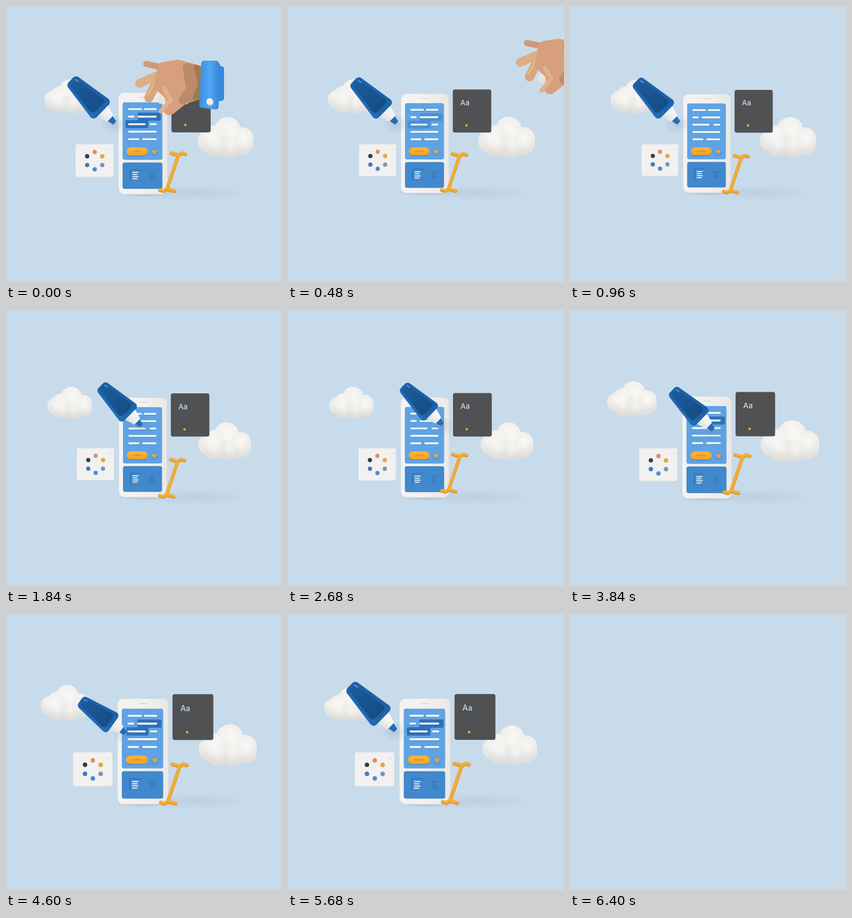
Write an HTML page with a canvas that moves like this. It is 500 by 500 pixels and loops after 6.44 s.

```html
<!DOCTYPE html>
<html lang="en">
<head>
<meta charset="utf-8">
<title>Design tools</title>
<style>
  html, body { margin: 0; width: 100%; height: 100%; overflow: hidden; background: #c8dbeb; }
  canvas { display: block; width: 500px; height: 500px; }
</style>
</head>
<body>
<canvas id="stage"></canvas>
<script>
const LOOP = 6440, STEP = 40, BLANK_AT = 6400, TAU = Math.PI * 2;
const canvas = document.getElementById('stage');
const g = canvas.getContext('2d');
const dpr = window.devicePixelRatio || 1;
canvas.width = canvas.height = 500 * dpr;

// Motion helpers
const span = (t, a, b) => Math.max(0, Math.min(1, (t - a) / (b - a)));
const ease = u => u * u * (3 - 2 * u);
const mix = (a, b, u) => a + (b - a) * u;
const bump = (t, peak, width) => ease(Math.max(0, 1 - Math.abs(t - peak) / width));
// Looping wave that crests n times, first at the given time
const wave = (t, n, crest) => Math.cos(TAU * n * (t - crest) / LOOP);

const zoomAt = t => .959 + .0334 * wave(t, 1, 4984) + .0128 * wave(t, 2, 2069);

// Marker stops: time, tip x, tip y
const STOPS = [[1000, 197, 212], [2550, 283, 208], [3300, 242, 205], [3800, 260, 217], [4720, 215, 216], [5500, 195, 211]];

function tipAt(t) {
  let [, x, y] = STOPS[0];
  for (let i = 1; i < STOPS.length; i++) {
    const [t1, x1, y1] = STOPS[i];
    const u = ease(span(t, STOPS[i - 1][0], t1));
    x = mix(x, x1, u);
    y = mix(y, y1, u);
  }
  return [x, y];
}

// Drawing helpers
function box(x, y, w, h, r, fill) {
  g.beginPath();
  g.roundRect(x, y, w, h, r);
  g.fillStyle = fill;
  g.fill();
}

function dot(x, y, r, fill) {
  g.beginPath();
  g.arc(x, y, r, 0, TAU);
  g.fillStyle = fill;
  g.fill();
}

function line(pts, width, color) {
  g.beginPath();
  pts.forEach(p => g.lineTo(...p));
  g.lineWidth = width;
  g.strokeStyle = color;
  g.lineCap = g.lineJoin = 'round';
  g.stroke();
}

// Polygon with rounded corners
function blob(pts, r, fill) {
  const n = pts.length, last = pts[n - 1];
  g.beginPath();
  g.moveTo((last[0] + pts[0][0]) / 2, (last[1] + pts[0][1]) / 2);
  pts.forEach((p, i) => g.arcTo(...p, ...pts[(i + 1) % n], r));
  g.closePath();
  g.fillStyle = fill;
  g.fill();
}

// Shape along the x axis with half-height h1 at x1 and h2 at x2
const taper = (x1, h1, x2, h2, r, fill) => blob([[x1, -h1], [x2, -h2], [x2, h2], [x1, h1]], r, fill);

function shade(x1, y1, x2, y2, ...colors) {
  const s = g.createLinearGradient(x1, y1, x2, y2);
  colors.forEach((c, i) => s.addColorStop(i / (colors.length - 1), c));
  return s;
}

function glow(x, y, rx, ry, rgb, alpha) {
  at(x, y, rx, ry, () => {
    const s = g.createRadialGradient(0, 0, 0, 0, 0, 1);
    s.addColorStop(0, `rgba(${rgb},${alpha})`);
    s.addColorStop(1, `rgba(${rgb},0)`);
    dot(0, 0, 1, s);
  });
}

function at(x, y, sx, sy, draw) {
  g.save();
  g.translate(x, y);
  g.scale(sx, sy);
  draw();
  g.restore();
}

// A ring of lobes with one tall puff on top
function cloud(x, y, width) {
  const puffs = [[2, -12, 22]];
  for (let i = 0; i < 7; i++) {
    const a = TAU * (i + .5) / 7;
    puffs.push([30 * Math.cos(a), 6 + 10 * Math.sin(a), 18.5]);
  }
  at(x, y, width / 97, width / 97, () => {
    const base = shade(0, -35, 0, 35, '#f3f2ef', '#efedea', '#dddbd8');
    dot(0, 4, 24, base);
    puffs.forEach(([px, py, r]) => dot(px, py, r, base));
    puffs.forEach(([px, py, r]) => glow(px + 1, py - 4, r * .8, r * .8, '250,249,247', .75));
  });
}

function heart(x, y, s) {
  g.beginPath();
  g.moveTo(x, y + s);
  g.bezierCurveTo(x - s * 2, y - s * .4, x - s * .8, y - s * 1.5, x, y - s * .5);
  g.bezierCurveTo(x + s * .8, y - s * 1.5, x + s * 2, y - s * .4, x, y + s);
  g.fillStyle = '#f5a623';
  g.fill();
}

// Text rows run from LEFT to RIGHT, each broken by one gap
const LEFT = 220, RIGHT = 274;
const GAPS = [[246, 250], [232, 238], [253, 261], [RIGHT, RIGHT], [241, 247]];
const rowY = i => 184 + 14.25 * i;

function textBar(x1, x2, y) {
  if (x1 >= x2) return;
  box(x1, y - .4, x2 - x1, 3.2, 1.5, 'rgba(45,105,165,.4)');
  box(x1, y - 1.8, x2 - x1, 3.6, 1.5, '#f8f8f8');
}

// Grows from its right edge; the previous one fades early in the loop
function highlight(t, right, width, row, from, to) {
  const fresh = t > 2000;
  const w = width * (fresh ? span(t, from, to) : 1);
  g.globalAlpha = fresh ? 1 : 1 - span(t, 80, 720);
  if (w) box(right - w, rowY(row) - 7.5, w, 15, 2, '#2c70b8');
  g.globalAlpha = 1;
}

function phone(t) {
  box(202, 154, 92.5, 192, 10, '#d6d9dd');
  box(202, 153, 92, 191.5, 10, shade(202, 0, 294, 0, '#f5f3f1', '#f3f1ee', '#eae8e6'));
  box(241, 161, 15, 1.5, 1, '#d5d4d3');
  box(209.5, 171, 75.5, 109, 4, '#5fa3e4');
  box(209.5, 285, 75.5, 50, 4, '#4288cd');

  highlight(t, 282, 44, 1, 2700, 3350);
  highlight(t, 258, 43, 2, 3800, 4660);
  GAPS.forEach(([a, b], i) => {
    textBar(LEFT, a, rowY(i));
    textBar(b, RIGHT, rowY(i));
  });

  box(217, 257.5, 40, 16, 8, '#4a88c8');
  box(217, 256.5, 40, 15.5, 8, shade(0, 256, 0, 272, '#fbb63c', '#f2a21f'));
  box(229, 263, 16, 2.5, 1, '#d98b55');
  dot(270, 265.5, 7.5, '#4a88c8');
  dot(270, 264.5, 7.5, '#5c9fe1');
  heart(270, 265, 4);

  box(223, 298, 23, 22, 3, '#2f72b6');
  box(225, 299.5, 21, 20.5, 2, '#4189ce');
  for (let i = 0; i < 4; i++) {
    const y = 303 + i * 4, w = 12 - i % 2 * 2;
    box(228, y, w, 1.8, 1, '#eef3f8');
    box(260, y + 1, w, 1, .5, '#2c68a5');
  }
}

function darkCard() {
  box(302, 144.5, 74.5, 83.5, 4, '#505153');
  g.fillStyle = '#cfdae3';
  g.font = '500 14px Inter, "Open Sans", sans-serif';
  g.fillText('Aa', 316.5, 175);
  dot(328.5, 214, 2.4, '#f0a048');
}

const SWATCHES = ['#d4936a', '#eba63c', '#7096c4', '#478ed5', '#377bc9', '#343b45'];
function paletteCard() {
  box(120.5, 251, 72, 62, 4, '#dadfe4');
  box(120.5, 250.5, 71.5, 61.5, 4, '#f2f1ef');
  SWATCHES.forEach((c, i) => {
    const a = TAU * (i / 6 - .25);
    const x = 156.7 + Math.cos(a) * 16.5, y = 281.5 + Math.sin(a) * 16.5;
    dot(x, y + .6, 4, 'rgba(100,100,110,.3)');
    dot(x, y, 4, c);
  });
  dot(185, 260, 2.6, '#d9dadb');
  dot(184.6, 259.4, 2.2, '#f1f1f1');
}

// Both ends are the same curve, turned half round
function textCursor(x, y, zoom) {
  const end = [[-3, -36], [4, -34], [11, -32], [17, -36], [24, -34]];
  const pass = (dy, width, color) => {
    line([[11, -32], [-11, 32 + dy]], width, color);
    for (const s of [1, -1]) line(end.map(([px, py]) => [px * s, py * s + dy]), width, color);
  };
  at(x, y, zoom, zoom, () => {
    pass(1, 6.4, '#d9911f');
    pass(0, 5.8, '#f0a52c');
    pass(-1, 1.5, '#f8b748');
  });
}

function marker(t, zoom) {
  const [x, y] = tipAt(t);
  const tilt = bump(t, 4620, 950), over = (x - 196) / 87;
  const scale = zoom * (1.08 - .1 * over - .11 * tilt);
  glow(x - 2, y + 2, 24, 18, '110,140,175', .25);
  at(x, y, scale, scale, () => {
    g.rotate((44.5 - 9 * tilt) * Math.PI / 180);
    taper(-20, 8, 0, 4, 2, '#256cb5');
    taper(-38, 16, -11, 8, 3, shade(0, -16, 0, 16, '#fafafa', '#f0f0ee', '#d5dae0'));
    taper(-108, 12, -30, 23.5, 7, shade(0, -23, 0, 23, '#1d62a8', '#1b5fa6', '#2470b9'));
    taper(-104, 7, -39, 17, 6, shade(-104, 0, -39, 0, '#1c5b9c', '#164d87'));
    line([[-34, -19], [-33, 19]], 2.5, '#2168af');
    line([[-103, -6], [-97, -7]], 2, '#5a9cda');
  });
}

function hand(t) {
  const out = ease(span(t, 0, 820));
  if (out === 1) return;
  at(285 * out, -38 * Math.sin(Math.min(1, out * 1.6) * TAU / 4), 1, 1, () => {
    // fingers
    line([[254, 105], [292, 113]], 11, '#cf9979');
    line([[242, 140], [284, 122]], 16, '#deae86');
    line([[259, 166], [269, 146], [290, 130]], 17, '#d9a67c');
    line([[257, 161], [268, 140], [286, 122]], 2.5, '#e4c28e');
    dot(281, 169, 8, '#e8e3dc');
    // palm and thumb
    blob([[276, 103], [312, 97], [356, 109], [356, 168], [326, 177], [300, 198], [272, 198], [293, 171], [268, 148]], 12, '#d79f7e');
    blob([[318, 101], [354, 109], [354, 169], [330, 174], [292, 200], [326, 148]], 8, '#bd8b69');
    blob([[338, 105], [354, 109], [354, 169], [336, 172], [348, 140]], 4, '#9f7a50');
    line([[281, 191], [298, 170], [287, 150]], 8, '#e2b08c');
    // cuff
    box(374, 109, 21, 63, 5, '#3788dc');
    blob([[354, 99], [383, 99], [388, 107], [385, 188], [350, 184]], 5, shade(350, 0, 388, 0, '#3b8fe2', '#50a7f3', '#3484d6'));
    dot(370, 174.5, 6.3, '#b9c5d0');
    dot(369, 173, 6, '#f0efeb');
  });
}

function render(t) {
  g.setTransform(dpr, 0, 0, dpr, 0, 0);
  g.fillStyle = '#c8dbeb';
  g.fillRect(0, 0, 500, 500);
  if (t >= BLANK_AT) return;

  const zoom = zoomAt(t), pulse = wave(t, 2, 700);
  const puff = zoom * (1 + .05 * pulse);
  glow(340, 339, 100, 15, '120,145,175', .16);
  glow(250, 249 + 95 * zoom, 52, 7, '120,145,175', .45);
  cloud(248 - 140 * zoom, 249 - 88 * zoom - 3 * pulse, 92 * puff);
  cloud(300 + 104 * zoom, 238, 108.5 * puff);
  at(248, 249, zoom, zoom, () => {
    g.translate(-248, -249);
    phone(t);
    darkCard();
    paletteCard();
  });
  textCursor(248 + 56.5 * zoom, 248 + 56 * zoom + 4 * wave(t, 1, 0) + 5 * wave(t, 2, 1610), zoom);
  marker(t, zoom);
  hand(t);
}

const start = performance.now();
function tick() {
  const t = (performance.now() - start) % LOOP;
  render(Math.floor(t / STEP) * STEP);
  requestAnimationFrame(tick);
}
tick();
</script>
</body>
</html>
```
